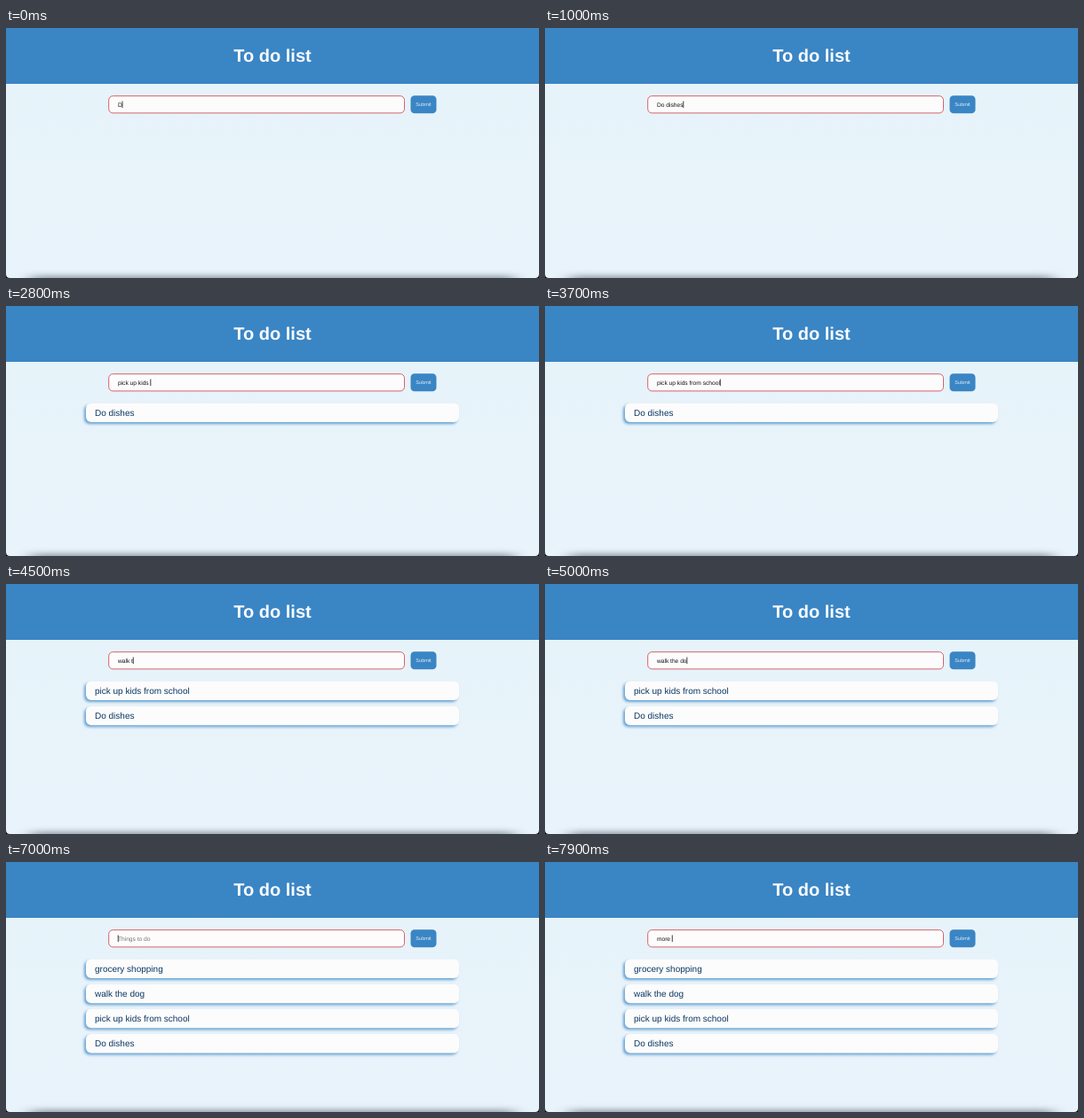
Write an HTML page that moves like this. It is 600x282 px and loops after 8000 ms.

```html
<!DOCTYPE html>
<html lang="en">
<head>
<meta charset="utf-8">
<title>To do list</title>
<style>
  html, body { margin: 0; width: 100%; height: 100%; overflow: hidden; background: #e8f3fa; }
  svg { display: block; width: 600px; height: 282px; }
  text {
    font-family: "Liberation Sans", Arial, sans-serif;
    white-space: pre;
    text-rendering: geometricPrecision;
  }
  .title { font-size: 20px; font-weight: 700; fill: #f8fbfe; text-anchor: middle; }
  .submit { font-size: 5.56px; fill: #e3eff8; text-anchor: middle; }
  .entry { font-size: 6.67px; fill: #111; }
  .entry.hint { fill: #757575; }
  .item rect { fill: #fcfcfc; filter: drop-shadow(-1.2px 2px 1.6px rgba(59, 134, 196, .75)); }
  .item text { font-size: 10px; fill: #0b3763; }
</style>
</head>
<body>
<svg viewBox="0 0 600 282">
  <defs>
    <linearGradient id="page" x1="0" y1="0" x2="0" y2="1">
      <stop offset="0" stop-color="#e6f3f9"/>
      <stop offset="1" stop-color="#e9f3fb"/>
    </linearGradient>
    <filter id="soft" x="-10%" y="-200%" width="120%" height="500%">
      <feGaussianBlur stdDeviation="9 3.5"/>
    </filter>
  </defs>
  <rect width="600" height="282" fill="url(#page)"/>
  <rect width="600" height="63" fill="#3a85c4"/>
  <text class="title" x="300" y="38">To do list</text>

  <rect x="115.7" y="76.7" width="332.8" height="19.2" rx="4.6" fill="#fcfcfc" stroke="#d5505c" stroke-width=".9"/>
  <text class="entry" id="entry" x="125.9" y="88.5"></text>
  <rect id="caret" y="82.5" width=".8" height="7.6" fill="#111"/>

  <rect x="455.5" y="76.3" width="29" height="20" rx="4.4" fill="#3a85c4"/>
  <text class="submit" x="470" y="88.2">Submit</text>

  <g id="list"></g>

  <rect x="28" y="280" width="544" height="8" fill="#5f6b75" opacity=".75" filter="url(#soft)"/>
  <path d="M0 277.5 Q0 282 4.5 282 H0Z M600 277.5 Q600 282 595.5 282 H600Z" fill="#000"/>
</svg>
<script>
const LOOP = 8000, STEP = 100;
const LEFT = 125.9;

// keys: [time, characters typed]; the count runs evenly between them
const tasks = [
  { text: "Do dishes", keys: [[0, 1], [800, 9]], submit: 1200 },
  { text: "pick up kids from school", keys: [[1400, 1], [1900, 6], [2700, 12], [3600, 24]], submit: 3800 },
  { text: "walk the dog", keys: [[4000, 1], [5100, 12]], submit: 5300 },
  { text: "grocery shopping", keys: [[5500, 1], [6100, 7], [6800, 16]], submit: 6900 },
  { text: "more ", keys: [[7300, 1], [7800, 5]], submit: Infinity }
];

const entry = document.getElementById("entry");
const caret = document.getElementById("caret");
const list = document.getElementById("list");

function add(parent, tag, attrs) {
  const node = document.createElementNS("http://www.w3.org/2000/svg", tag);
  for (const name in attrs) node.setAttribute(name, attrs[name]);
  return parent.appendChild(node);
}

const items = tasks.slice(0, -1).map(task => {
  const group = add(list, "g", { class: "item" });
  add(group, "rect", { x: 90, y: 109.5, width: 420, height: 21.5, rx: 6 });
  add(group, "text", { x: 100, y: 123.8 }).textContent = task.text;
  return group;
});

function typedCount(keys, t) {
  if (t < keys[0][0]) return 0;
  for (let i = 1; i < keys.length; i++) {
    const [t0, n0] = keys[i - 1], [t1, n1] = keys[i];
    if (t < t1) return Math.floor(n0 + (n1 - n0) * (t - t0) / (t1 - t0) + 1e-6);
  }
  return keys[keys.length - 1][1];
}

function draw(t) {
  const done = tasks.filter(task => t >= task.submit).length;
  const task = tasks[done];
  const typed = task.text.slice(0, typedCount(task.keys, t));

  entry.textContent = typed || "Things to do";
  entry.classList.toggle("hint", !typed);
  const width = typed ? entry.getComputedTextLength() : 0;
  caret.setAttribute("x", LEFT + width - 0.1);

  items.forEach((item, i) => {
    item.style.display = i < done ? "" : "none";
    item.setAttribute("transform", `translate(0 ${(done - 1 - i) * 28.15})`);
  });
}

const start = performance.now();
let shown = -1;
function tick() {
  const t = (performance.now() - start) % LOOP;
  const step = Math.floor(t / STEP) * STEP;
  if (step !== shown) draw(shown = step);
  requestAnimationFrame(tick);
}
tick();
</script>
</body>
</html>
```
